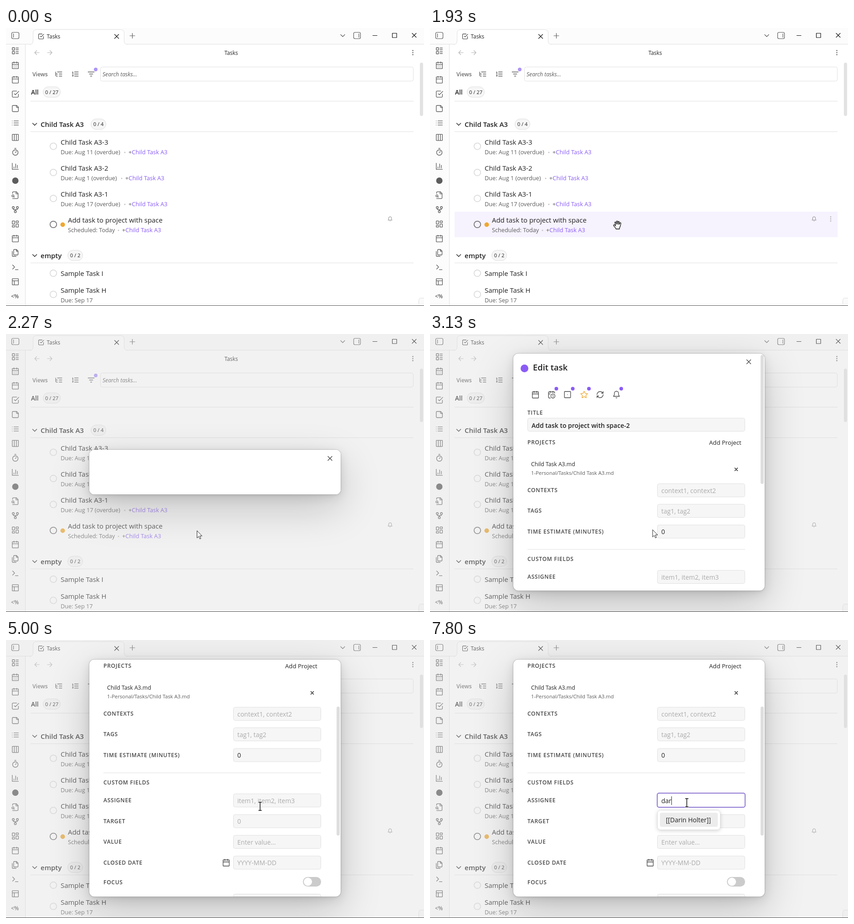
An HTML page that plays this animation: 918 px wide and 610 px high, repeating every 8 s.

```html
<!DOCTYPE html>
<html lang="en">
<head>
<meta charset="utf-8">
<title>Edit task</title>
<style>
html, body { margin: 0; width: 100%; height: 100%; overflow: hidden; background: #fff; }
#stage { position: relative; width: 918px; height: 610px; overflow: hidden; }
svg { position: absolute; left: 0; top: 0; width: 918px; height: 610px; }
text { font-family: "Open Sans", "Noto Sans", sans-serif; white-space: pre; }
#dim { position: absolute; inset: 0; background: rgba(220, 220, 220, .36); }
#modal {
  position: absolute; left: 183px; width: 552px; overflow: hidden; border-radius: 11px; background: #fff;
  box-shadow: 0 0 0 1px rgba(0, 0, 0, .14), 0 2px 7px rgba(0, 0, 0, .07),
    0 6px 25px rgba(0, 0, 0, .11), 0 30px 90px rgba(0, 0, 0, .2);
}
#modal svg { left: -183px; top: -43px; }
#popBox { filter: drop-shadow(0 2px 4px rgba(0, 0, 0, .16)); }
</style>
</head>
<body>
<div id="stage">
  <svg id="page"></svg>
  <div id="dim"></div>
  <div id="modal"><svg id="form"></svg></div>
  <svg id="top"></svg>
</div>
<script>
const $ = id => document.getElementById(id);
const INK = '#222', MUTED = '#5c5c5c', FAINT = '#ababab', RULE = '#e0e0e0', PURPLE = '#8a5cf5';

// drawing helpers, all returning SVG markup
const text = (x, y, size, str, fill = INK, more = '') =>
  `<text x="${x}" y="${y}" font-size="${size}" fill="${fill}" ${more}>${str}</text>`;
const rect = (x, y, w, h, r = 0, fill = 'none', stroke = 'none', more = '') =>
  `<rect x="${x}" y="${y}" width="${w}" height="${h}" rx="${r}" fill="${fill}" stroke="${stroke}" ${more}/>`;
const dot = (x, y, r, fill) => `<circle cx="${x}" cy="${y}" r="${r}" fill="${fill}"/>`;
const ring = (x, y, stroke) => `<circle cx="${x}" cy="${y}" r="7.2" fill="none" stroke="${stroke}" stroke-width="1.8"/>`;
const line = (d, stroke = INK, w = 1.2) =>
  `<path d="${d}" fill="none" stroke="${stroke}" stroke-width="${w}" stroke-linecap="round" stroke-linejoin="round"/>`;
const rule = (y, x0 = 54, x1 = 895) => rect(x0, y, x1 - x0, 1, 0, RULE);
const cross = (x, y, r, color = INK, w = 1.3) =>
  line(`M${x - r} ${y - r}l${2 * r} ${2 * r}m0 ${-2 * r}l${-2 * r} ${2 * r}`, color, w);
const kebab = (x, y, color) => [-4.5, 0, 4.5].map(d => dot(x, y + d, 1.2, color)).join('');
const bold = 'font-weight="600"';

// icons on a 24 unit grid
const box = (x, y, w, h) => `M${x + 1} ${y}h${w - 2}q1 0 1 1v${h - 2}q0 1-1 1h${2 - w}q-1 0-1-1v${2 - h}q0-1 1-1z`;
const circ = (x, y, r) => `M${x - r} ${y}a${r} ${r} 0 1 0 ${2 * r} 0a${r} ${r} 0 1 0 ${-2 * r} 0`;
const frame = box(3, 3, 18, 18);
const calendar = box(3, 4, 18, 18) + 'M8 2v4M16 2v4M3 10h18';
const icons = {
  layout: box(3, 3, 7, 7) + box(3, 14, 7, 7) + 'M14 4h7M14 9h7M14 15h7M14 20h7',
  days: calendar + 'M8 14h.01M12 14h.01M16 14h.01M8 18h.01M12 18h.01M16 18h.01',
  calendar,
  check: 'M9 11l3 3L22 4M21 12v7a2 2 0 0 1-2 2H5a2 2 0 0 1-2-2V5a2 2 0 0 1 2-2h11',
  note: 'M16 3H5a2 2 0 0 0-2 2v14a2 2 0 0 0 2 2h14a2 2 0 0 0 2-2V8ZM15 3v4a2 2 0 0 0 2 2h4',
  list: 'M8 6h13M8 12h13M8 18h13M3 6h.01M3 12h.01M3 18h.01',
  columns: frame + 'M9 3v18M15 3v18',
  timer: 'M10 2h4M12 14l3-3' + circ(12, 14, 8),
  chart: 'M3 3v18h18M18 17V9M13 17V5M8 17v-3',
  search: 'M4 22h14a2 2 0 0 0 2-2V7l-5-5H6a2 2 0 0 0-2 2v3M14 2v6h6M9 18l-1.5-1.5' + circ(5, 14, 3),
  graph: circ(12, 18, 3) + circ(6, 6, 3) + circ(18, 6, 3) + 'M18 9v2q0 1-1 1H7q-1 0-1-1V9M12 12v3',
  board: box(3, 3, 7, 9) + box(14, 3, 7, 5) + box(14, 12, 7, 9) + box(3, 16, 7, 5),
  files: 'M15.5 2H8.6Q7 2 7 3.6v12.8Q7 18 8.6 18h9.8q1.6 0 1.6-1.6V6.5zM3 7.6v12.8Q3 22 4.6 22h9.8M15 2v5h5',
  terminal: 'M4 17l6-6-6-6M12 19h8',
  panels: frame + 'M3 9h18M9 21V9',
  tree: 'M21 12h-8M21 6H8M21 18h-8M3 6v4q0 2 2 2h3M3 10v6q0 2 2 2h3',
  ordered: 'M10 6h11M10 12h11M10 18h11M4 6h1v4M4 10h2M6 18H4c0-1 2-2 2-3s-1-1.5-2-1',
  filter: 'M3 6h18M7 12h10M10 18h4',
  bell: 'M6 8a6 6 0 0 1 12 0c0 7 3 9 3 9H3s3-2 3-9M10.3 21a2 2 0 0 0 3.4 0',
  clock: 'M21 7.5V6a2 2 0 0 0-2-2H5a2 2 0 0 0-2 2v14a2 2 0 0 0 2 2h3.5M16 2v4M8 2v4M3 10h5M17.5 17.5L16 16.2V14' + circ(16, 16, 6),
  status: frame + 'M12 12h.01',
  star: 'M12 2l3.1 6.3 6.9 1-5 4.9 1.2 6.9L12 17.8l-6.2 3.3L7 14.2 2 9.3l6.9-1z',
  repeat: 'M3 12a9 9 0 0 1 9-9 9.8 9.8 0 0 1 6.7 2.7L21 8M21 3v5h-5M21 12a9 9 0 0 1-9 9 9.8 9.8 0 0 1-6.7-2.7L3 16M8 16H3v5'
};
const icon = (name, x, y, color = MUTED, k = .75) =>
  `<g transform="translate(${x - 12 * k} ${y - 12 * k}) scale(${k})">${line(icons[name], color, 1.75)}</g>`;

function drawPage() {
  const side = ['layout', 'days', 'calendar', 'check', 'note', 'list', 'columns', 'timer', 'chart', '',
    'search', 'graph', 'board', 'calendar', 'files', 'terminal', 'panels'];
  const pill = (x, y, w, str) => rect(x + .5, y - 11.5, w - 1, 23, 11.5, '#f6f6f6', RULE) +
    text(x + w / 2, y + 4, 11.2, str, INK, 'text-anchor="middle"');
  const group = (y, name, x, w, count) => line(`M58.5 ${y - 2}l4.5 4.5 4.5-4.5`, '#333', 1.5) +
    text(76, y + 6, 15, name, INK, bold) + pill(x, y, w, count) + rule(y + 16);
  const task = (y, x, title, due, linkX) => text(x, y, 14.9, title) + text(x, y + 20.8, 12.7, due, MUTED) +
    (linkX ? dot(linkX - 8, y + 17, 1.5, '#c4c4c4') +
      text(linkX, y + 20.8, 12.8, `+<tspan fill="${PURPLE}">Child Task A3</tspan>`, MUTED) : '');
  const light = '#dcdcdc';

  $('page').innerHTML =
    rect(0, 0, 918, 610, 0, '#fff') + rect(0, 0, 918, 36, 0, '#fcfcfc') + rect(0, 35, 918, 1, 0, RULE) +
    rect(0, 36, 42, 574, 0, '#fcfcfc') + rect(42, 36, 1, 574, 0, RULE) +
    `<path d="M52 36q7.5 0 7.5-8V11q0-7.5 7.5-7.5H252q7.5 0 7.5 7.5V28q0 8 7.5 8" fill="#fff" stroke="${RULE}"/>` +
    line('M15.5 9.5h10q3 0 3 3v8q0 3-3 3h-10q-3 0-3-3v-8q0-3 3-3M16.5 12.5v8', MUTED) +
    line('M766.5 9.5h9q3 0 3 3v8q0 3-3 3h-9q-3 0-3-3v-8q0-3 3-3M775 12.5v8', MUTED) +
    icon('check', 77, 18.5, '#333', .6) + text(89.5, 22.5, 11.8, 'Tasks') + cross(243, 18.5, 4.5) +
    line('M272 17h11M277.5 11.5v11', MUTED) + line('M735 14.5l4.5 4.5 4.5-4.5', MUTED) +
    line('M805.5 16.5h9.5M848.5 11.5h9.5v9.5h-9.5z', '#111') + cross(896.5, 16, 4.5, '#111', 1.1) +
    side.map((n, i) => n ? icon(n, 20.5, 50 + i * 31.68) : dot(20.5, 335, 7, MUTED)).join('') +
    text(11, 592.5, 12, '&lt;%', MUTED, bold) +
    line('M73 54h-10m4.5-4.5l-4.5 4.5 4.5 4.5M91 54h10m-4.5-4.5l4.5 4.5-4.5 4.5', '#b5b5b5') +
    text(494.5, 59, 11.8, 'Tasks', INK, 'text-anchor="middle"') + kebab(893.5, 54, MUTED) +
    text(58, 106, 12.2, 'Views', '#6b6b6b', bold) +
    icon('tree', 116, 101) + icon('ordered', 152, 101) + icon('filter', 187, 101) + dot(197, 91, 4, '#ad94f7') +
    rect(207.5, 85.5, 687, 31, 4, '#fff', RULE) + text(212, 106, 12.2, 'Search tasks...', MUTED, 'font-style="italic"') +
    text(55, 146, 13.5, 'All', INK, bold) + pill(81, 140.5, 39, '0 / 27') + rule(160) +
    rect(909, 76, 7, 117, 3.5, '#e2e2e2') +
    `<g id="hover">${rect(54, 403, 841, 56, 0, '#f6f2fe') + kebab(880, 419, FAINT)}</g>` +
    group(211, 'Child Task A3', 186, 34, '0 / 4') +
    ring(104, 259.5, light) + task(256, 120, 'Child Task A3-3', 'Due: Aug 11 (overdue)', 269) +
    ring(104, 317, light) + task(313, 120, 'Child Task A3-2', 'Due: Aug 1 (overdue)', 262) +
    ring(104, 374, light) + task(370, 120, 'Child Task A3-1', 'Due: Aug 17 (overdue)', 269) +
    ring(104, 431, '#757575') + dot(124.5, 431.5, 5, '#f0a830') +
    task(427, 136, 'Add task to project with space', 'Scheduled: Today', 255) + icon('bell', 843.5, 419, '#777', .5) +
    group(499, 'empty', 135, 34, '0 / 2') +
    ring(104, 538, light) + task(544, 120, 'Sample Task I', '') +
    ring(104, 584.5, light) + task(581, 120, 'Sample Task H', 'Due: Sep 17') +
    `<path d="M918 592.5h-6q-5.5 0-5.5 6V610H918" fill="#fafafa" stroke="${RULE}"/>`;
}

// the form is laid out in stage coordinates, unscrolled
function drawForm() {
  const label = (y, str) => text(214, y, 12, str, '#444', 'font-weight="600" letter-spacing=".75"');
  const input = (y, str, fill = FAINT, x = 499) =>
    rect(x + .5, y + .5, 691 - x, 29, 4, '#f6f6f6', RULE) + text(508, y + 20.5, 14, str, fill);
  const row = (y, name, hint, fill) => label(y + 19, name) + input(y, hint, fill);
  const tools = [['calendar', 231.5], ['clock', 267], ['status', 302], ['star', 338.5], ['repeat', 373.5], ['bell', 409.5]];

  $('form').innerHTML = '<g id="scroll">' +
    dot(207.5, 75.5, 8.5, PURPLE) + text(226, 79.5, 18.4, 'Edit task', INK, bold) + cross(700, 61, 4.5, '#444') +
    tools.map(([n, x]) => icon(n, x, 133, n == 'star' ? '#f0a62a' : '#484848')).join('') +
    [277.5, 313.5, 349, 420].map(x => dot(x, 120, 4, PURPLE)).join('') +
    label(176.5, 'TITLE') + input(184, '', INK, 214) + text(223, 205.5, 14, 'Add task to project with space-2', INK, bold) +
    label(241.5, 'PROJECTS') + text(613, 242.5, 13.2, 'Add Project') +
    text(222, 289.5, 12.2, 'Child Task A3.md') +
    text(222, 308.5, 11.25, '1-Personal/Tasks/Child Task A3.md', MUTED) + cross(672.5, 297, 3, INK, 1.5) +
    row(328, 'CONTEXTS', 'context1, context2') + row(373, 'TAGS', 'tag1, tag2') +
    row(418.5, 'TIME ESTIMATE (MINUTES)', '0', INK) + rule(472, 214, 692) +
    label(498, 'CUSTOM FIELDS') + row(518, 'ASSIGNEE', 'item1, item2, item3') +
    row(563.5, 'TARGET', '0') + row(609, 'VALUE', 'Enter value...') +
    row(654.5, 'CLOSED DATE', 'YYYY-MM-DD') + icon('calendar', 483.5, 669.5, '#484848') +
    label(716.5, 'FOCUS') + rect(652, 701, 40, 21, 10.5, '#cbcbcb') + dot(663, 711.5, 9, '#fff') +
    input(738, '') + '</g>' + rect(726, 46, 7, 283, 3.5, '#dedede', 'none', 'id="thumb"') +
    `<g id="blank">${rect(183, 43, 552, 98, 0, '#fff') + cross(711.5, 62, 4.5, '#444')}</g>`;
}

function drawTop() {
  const beam = 'M-3-9h6M0-9V9M-3 9h6';
  $('top').innerHTML = `<g id="focus">${rect(499, 336, 193, 31, 4, '#fff', '#8f78d2', 'stroke-width="2"')}` +
    text(508, 357.5, 14, 'item1, item2, item3', FAINT, 'id="hint"') + text(508, 357.5, 14, '', INK, 'id="typed"') +
    rect(0, 343, 1, 19, 0, INK, 'none', 'id="caret"') + '</g>' +
    `<g id="pop">${rect(499.5, 373.5, 138, 43, 7, '#fff', '#ddd', 'id="popBox"')}` +
    rect(505, 379, 127, 31, 4, '#ececec') + text(518, 400, 14, '[[Darin Holter]]') + '</g>' +
    rect(0, 609, 918, 1, 0, '#484848') +
    '<g id="cursor">' +
    '<path id="arrow" d="M.5.5V16.5L4 13 6.6 18.5 9 17.5 6.5 12H11.5Z" fill="#fff" stroke="#222"/>' +
    '<path id="hand" transform="translate(-10 -10)" d="M6.5 19C6 17 3 14 1.5 12 .5 10.5 2 9 3.5 10L5.5 12 4 5C3.7 3.3 6 3 6.4 4.6L7.5 9 7.6 2.6C7.6 1 10 1 10 2.6L10.3 9 11.4 3.4C11.8 1.9 13.9 2.3 13.7 3.9L13 9.5 15 6C15.8 4.6 17.7 5.5 17.2 7 16.5 10 16 14 14.5 16L14 19Z" fill="#fff" stroke="#111" stroke-width="1.3"/>' +
    `<g id="beam">${line(beam, '#fff', 3) + line(beam, '#111', 1.5)}</g></g>`;
}

// pointer path: time, x, y, shape from that time on
const path = [
  [600, 16, 26, 'arrow'], [1000, 235, 240, 'arrow'], [1266, 398, 402, 'arrow'], [1400, 392, 414, 'arrow'],
  [1533, 412, 432, 'hand'], [2199, 412, 432, 'hand'], [2200, 413, 431, 'arrow'], [2600, 449, 432, 'arrow'],
  [2733, 449, 432, 'arrow'], [2800, 448, 433, 'arrow'], [3066, 448, 433, 'arrow'], [3133, 488, 429, 'arrow'],
  [3266, 560, 422, 'beam'], [3466, 600, 392, 'beam'], [3733, 571, 354, 'beam'], [4666, 571, 354, 'beam'],
  [4866, 553, 361, 'beam'], [5000, 558, 365, 'beam'], [5133, 566, 358.5, 'beam'], [5200, 566, 358.5, 'beam'],
  [5266, 568, 358.5, 'beam'], [5400, 568, 358.5, 'beam'], [5533, 564, 357, 'beam'], [8001, 564, 357, 'beam']
];
const show = (id, on) => $(id).style.display = on ? '' : 'none';
const ramp = (t, a, b) => Math.max(0, Math.min(1, (t - a) / (b - a)));

function movePointer(t) {
  show('cursor', t >= 600);
  if (t < 600) return;
  const i = path.findIndex(p => p[0] > t), a = path[i - 1], b = path[i], k = ramp(t, a[0], b[0]);
  $('cursor').setAttribute('transform', `translate(${a[1] + (b[1] - a[1]) * k} ${a[2] + (b[2] - a[2]) * k})`);
  for (const shape of ['arrow', 'hand', 'beam']) show(shape, shape == a[3]);
}

function render(ms) {
  const t = Math.floor(ms * .015 + .06) / .015 + .5;   // the picture ticks 15 times a second
  const open = t >= 2200, full = t >= 2333;
  $('hover').style.opacity = t < 2266 ? ramp(t, 1800, 1933) : 0;
  show('dim', open);
  show('modal', open);
  show('blank', !full);
  $('modal').style.top = (full ? 43 : 254) + 'px';
  $('modal').style.height = (full ? 520 : 98) + 'px';

  const turns = (t >= 4000) + (t >= 4266);
  $('scroll').setAttribute('transform', `translate(0 ${-90.5 * turns})`);
  $('thumb').setAttribute('y', 46 + 50 * turns);

  const typed = 'dar'.slice(0, (t >= 7533) + (t >= 7666) + (t >= 7800));
  $('focus').style.opacity = ramp(t, 5400, 5733);
  $('typed').textContent = typed;
  show('hint', !typed);
  $('caret').setAttribute('x', 507 + (typed ? $('typed').getComputedTextLength() + 1 : 0));
  show('caret', typed || Math.floor((t - 5600) / 533.3) % 2 == 0);
  show('pop', t >= 7600);
  movePointer(t);
}

drawPage();
drawForm();
drawTop();
const start = performance.now();
(function tick() {
  render((performance.now() - start) % 8000);
  requestAnimationFrame(tick);
})();
</script>
</body>
</html>
```
